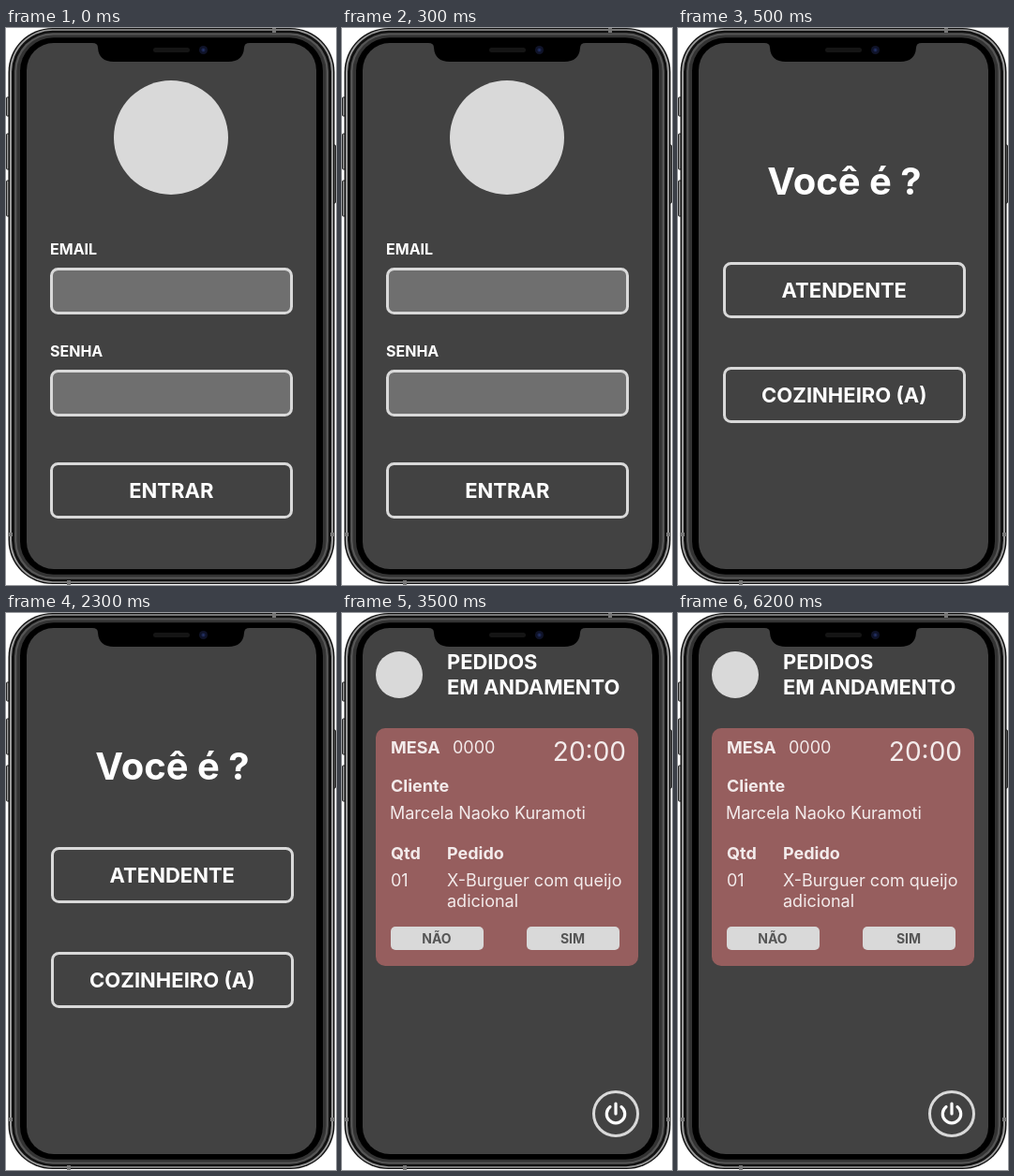
Recreate the animation shown at these times as an HTML page. Size 352 px wide and 595 px high, loop 8 s.

```html
<!DOCTYPE html>
<html lang="pt-BR">
<head>
<meta charset="utf-8">
<title>Pedidos</title>
<style>
html, body { margin: 0; width: 100%; height: 100%; overflow: hidden; background: #fff; }
svg { display: block; width: 352px; height: 595px; font-family: Inter, sans-serif; }
</style>
</head>
<body>
<svg id="stage" viewBox="0 0 352 595">
  <defs>
    <radialGradient id="lens">
      <stop offset="0" stop-color="#26366f"/>
      <stop offset="1" stop-color="#0b0e20"/>
    </radialGradient>
  </defs>
  <g id="phone"></g>
  <g id="screen"></g>
  <g id="notch">
    <path d="M92 16Q98 16 98 21Q99 36 115 36H237Q253 36 254 21Q254 16 260 16V14H92Z" fill="#000"/>
    <rect x="157" y="21" width="39" height="5" rx="2.5" fill="#151515"/>
    <circle cx="210.5" cy="23.5" r="4.5" fill="#10142a"/>
    <circle cx="210.5" cy="23.5" r="3" fill="url(#lens)"/>
  </g>
</svg>
<script>
const GREY = '#d9d9d9', CREAM = '#f3ebeb';

const box = (x, y, w, h, r, fill, stroke = 'none', sw = 0) =>
  `<rect x="${x}" y="${y}" width="${w}" height="${h}" rx="${r}" fill="${fill}" stroke="${stroke}" stroke-width="${sw}"/>`;
const disc = (x, y, r, fill = GREY) => `<circle cx="${x}" cy="${y}" r="${r}" fill="${fill}"/>`;
const text = (x, y, size, weight, str, fill = '#fff', anchor = 'start') =>
  `<text x="${x}" y="${y}" font-size="${size}" font-weight="${weight}" fill="${fill}" text-anchor="${anchor}">${str}</text>`;
const outlined = (x, y, h, fill = 'none') => box(x + 1.5, y + 1.5, 256, h - 3, 7, fill, GREY, 3);
const button = (x, y, label) =>
  outlined(x, y, 60) + text(x + 129.3, y + 38, 22, 700, label, '#fff', 'middle');
const field = (y, label) => text(47, y - 14, 16, 700, label) + outlined(47, y, 50, '#6f6f6f');
const choice = (x, label) =>
  box(x, 335, 99, 25, 5, GREY) + text(x + 49, 353, 14, 700, label, '#555', 'middle');
const bold = (x, y, str) => text(x, y, 18, 700, str, CREAM);
const plain = (x, y, str) => text(x, y, 18, 400, str, CREAM);

// The side walls are slightly thicker than the top and bottom ones.
const ring = (inset, fill) => {
  const dy = inset * 0.82;
  return box(2.5 + inset, dy, 348 - 2 * inset, 594 - 2 * dy, 47 - 0.92 * inset, fill);
};
const key = (x, y, h) => box(x, y, 4, h, 1, '#999', '#222', 1);
const seam = (x, y, w, h) => box(x, y, w, h, 0, '#777');

const phone =
  key(.5, 74, 20) + key(.5, 113, 38) + key(.5, 163, 38) + key(347.5, 125, 62) +
  ring(0, '#111') + ring(1.5, '#999') + ring(3.5, '#111') +
  ring(6.5, '#555') + ring(9, '#333') + ring(12.5, '#000') +
  seam(2, 539, 5, 4) + seam(346, 539, 5, 4) + seam(284, 0, 4, 5) + seam(65, 590, 4, 5) +
  box(22, 16, 309, 562, 29, '#424242');

const login =
  disc(176, 117, 61) + field(256, 'EMAIL') + field(365, 'SENHA') + button(47, 464, 'ENTRAR');

const role =
  text(177.5, 178, 40, 700, 'Você é ?', '#fff', 'middle') +
  button(48, 250, 'ATENDENTE') + button(48, 362, 'COZINHEIRO (A)');

const orders =
  disc(61, 66, 25) +
  text(112, 60, 21.9, 700, 'PEDIDOS') + text(112, 87, 21.9, 700, 'EM ANDAMENTO') +
  box(36, 123, 280, 254, 10, '#965e5e') +
  bold(52, 150, 'MESA') + plain(118, 150, '0000') +
  text(303, 158, 28, 400, '20:00', CREAM, 'end') +
  bold(52, 191, 'Cliente') + plain(51, 220, 'Marcela Naoko Kuramoti') +
  bold(52, 263, 'Qtd') + bold(112, 263, 'Pedido') +
  plain(52, 292, '01') + plain(112, 292, 'X-Burguer com queijo') + plain(112, 314, 'adicional') +
  choice(52, 'NÃO') + choice(197, 'SIM') +
  `<circle cx="292" cy="535" r="23.5" fill="none" stroke="${GREY}" stroke-width="3"/>
   <path d="M286 527.5A9.7 9.7 0 1 0 298 527.5M292 524V535" fill="none" stroke="#fff" stroke-width="3.2" stroke-linecap="round"/>`;

const LOOP = 8000;
const scenes = [[3500, orders], [500, role], [0, login]];
const screen = document.getElementById('screen');
document.getElementById('phone').innerHTML = phone;

let shown;
function draw(ms) {
  const scene = scenes.find(([from]) => ms >= from)[1];
  if (scene !== shown) screen.innerHTML = shown = scene;
}

const start = performance.now();
function tick() {
  draw((performance.now() - start) % LOOP);
  requestAnimationFrame(tick);
}
tick();
</script>
</body>
</html>
```
